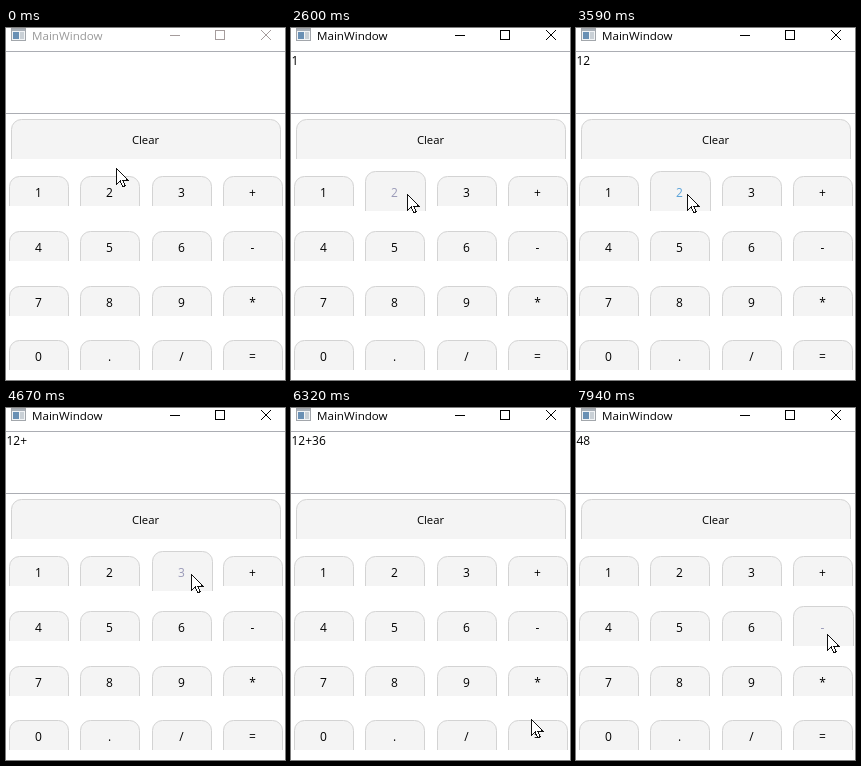
An HTML page for the animation above (8 s loop, 279 by 352 pixels).

```html
<!DOCTYPE html>
<html lang="en">
<head>
<meta charset="utf-8">
<title>Calculator</title>
<style>
  html, body { margin: 0; width: 100%; height: 100%; overflow: hidden; background: #fff; }
  svg { display: block; width: 279px; height: 352px; }
  text { font: 12px "Open Sans", "Noto Sans", sans-serif; }
  #title { font-size: 11.6px; }
  #clear { font-size: 11.3px; }
  .key { fill: #f4f4f4; stroke: #d3d3d3; }
  .label { text-anchor: middle; }
  #controls, #cursor { shape-rendering: crispEdges; }
</style>
</head>
<body>
<svg viewBox="0 0 279 352">
  <rect width="279" height="352" fill="#fff"/>
  <rect x="5.5" y=".5" width="14" height="12" fill="#f2f4f6" stroke="#a2a6ab"/>
  <path d="M6 2H19" stroke="#a9b0b8" stroke-width="2"/>
  <rect x="7" y="4" width="6" height="7" fill="#6a90b4"/>
  <rect x="14" y="4" width="4" height="7" fill="#c9d0d6"/>
  <text id="title" x="26" y="12">MainWindow</text>
  <path id="controls" fill="none" d="M164 7.5h10M209.500 2.500h9v9h-9zM255 2l10 10M265 2l-10 10"/>
  <path d="M0 23.500H279M0 85.500H279" stroke="#abadb3"/>
  <text id="display" x=".5" y="37"></text>
  <g id="keys"></g>
  <circle id="click" r="12" fill="#ff0" fill-opacity=".47"/>
  <path id="cursor" d="M.5 .5V16.500L4.200 13L6.900 18.700L9.300 17.600L6.700 12H11.700Z"
        fill="#fff" stroke="#111"/>
</svg>
<script>
const LOOP = 8000;
const STEP = 73;   // time between pointer positions
const HOLD = 150;  // time a click stays down
const START = { x: 110, y: 140 };

const glides = [
  { at: 1490, steps: 5, x: 43, y: 166 },
  { at: 2410, steps: 3, x: 116, y: 166 },
  { at: 2670, steps: 4, x: 243, y: 166 },
  { at: 2980, steps: 6, x: 111, y: 166 },
  { at: 3820, steps: 3, x: 243, y: 166 },
  { at: 4450, steps: 4, x: 185, y: 166 },
  { at: 5070, steps: 4, x: 176, y: 213 },
  { at: 6090, steps: 4, x: 240, y: 311 },
  { at: 6390, steps: 4, x: 243, y: 331 },
  { at: 7710, steps: 4, x: 251, y: 226 }
];
const clicks = [
  { at: 2040, key: "1" }, { at: 3440, key: "2" }, { at: 4290, key: "+" },
  { at: 4840, key: "3" }, { at: 5530, key: "6" }, { at: 6780, key: "=" }
];

const byId = id => document.getElementById(id);
const [title, controls, display, keyLayer, click, cursor] =
  ["title", "controls", "display", "keys", "click", "cursor"].map(byId);

function add(tag, attrs, content = "") {
  const el = document.createElementNS("http://www.w3.org/2000/svg", tag);
  for (const name in attrs) el.setAttribute(name, attrs[name]);
  el.textContent = content;
  return keyLayer.appendChild(el);
}

// Rounded at the top, square and without a border at the bottom.
const keyShape = (x, y, w, h) =>
  `M${x + .5} ${y + h}V${y + 10.5}a10 10 0 0 1 10 -10H${x + w - 10.5}a10 10 0 0 1 10 10V${y + h}`;

add("path", { class: "key", d: keyShape(5, 91, 270, 40) });
add("text", { id: "clear", class: "label", x: 139.5, y: 116 }, "Clear");

const keys = [..."123+456-789*0./="].map((name, i) => {
  const x = Math.round(2.8 + 71.5 * (i % 4));
  const y = Math.round(148 + 54.75 * Math.floor(i / 4));
  return {
    name, x, y,
    shape: add("path", { class: "key" }),
    label: add("text", { class: "label", x: x + 29.5, y: y + 21 }, name)
  };
});

const easeInOut = p => p < .5 ? 4 * p ** 3 : 1 - 4 * (1 - p) ** 3;
const mix = (a, b, p) => Math.round(a + (b - a) * p);

function pointerAt(t) {
  let pos = START;
  for (const { at, steps, x, y } of glides) {
    if (t < at) break;
    const done = Math.min(steps, Math.floor((t - at) / STEP) + 1);
    const p = easeInOut(done / steps);
    pos = { x: mix(pos.x, x, p), y: mix(pos.y, y, p) };
  }
  return pos;
}

const sum = text => text.split("+").reduce((total, n) => total + Number(n), 0);
const type = (text, { key }) => key === "=" ? String(sum(text)) : text + key;

function draw(t) {
  const { x: px, y: py } = pointerAt(t);
  for (const el of [cursor, click]) el.setAttribute("transform", `translate(${px} ${py})`);

  const entered = clicks.filter(({ at }) => t >= at + HOLD);
  const pressed = clicks.some(({ at }) => t >= at && t < at + HOLD);
  click.style.display = pressed ? "" : "none";
  display.textContent = entered.reduce(type, "");

  const active = t >= clicks[0].at;
  title.setAttribute("fill", active ? "#000" : "#999");
  controls.setAttribute("stroke", active ? "#000" : "#a59c9c");

  for (const { name, x, y, shape, label } of keys) {
    const hover = px >= x && px < x + 60 && py >= y && py < y + 30;
    const used = entered.some(({ key }) => key === name);
    shape.setAttribute("d", hover ? keyShape(x, y - 5, 61, 40) : keyShape(x, y, 60, 30));
    label.setAttribute("fill", !hover ? "#000" : used ? "#5ba3d9" : "#9a9ab8");
  }
}

const start = performance.now();
function tick() {
  draw((performance.now() - start) % LOOP);
  requestAnimationFrame(tick);
}
tick();
</script>
</body>
</html>
```
